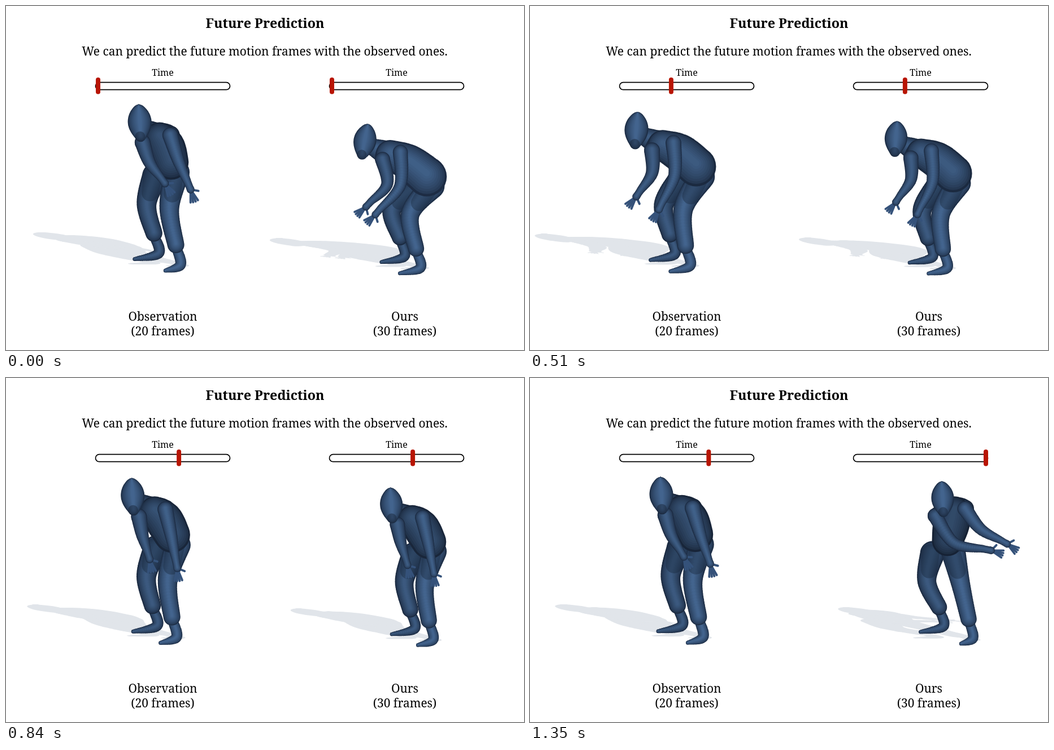
These frames come from a looping animation (917x611 px, 1.38 s). An HTML page with a canvas:

```html
<!DOCTYPE html>
<html lang="en">
<head>
<meta charset="utf-8">
<title>Future Prediction</title>
<style>
  html, body { margin: 0; width: 100%; height: 100%; overflow: hidden; background: #fff; }
  canvas, svg { position: absolute; left: 0; top: 0; width: 917px; height: 611px; }
  text { font: 20.9px "Noto Serif", serif; text-anchor: middle; }
  .title { font-size: 23.3px; font-weight: bold; }
  .small { font-size: 16px; }
  .track { fill: none; stroke: #000; stroke-width: 1.7px; }
  .thumb { fill: #b81503; }
</style>
</head>
<body>
<canvas width="917" height="611"></canvas>
<svg viewBox="0 0 917 611">
  <text class="title" x="458.5" y="39">Future Prediction</text>
  <text x="458" y="88">We can predict the future motion frames with the observed ones.</text>
  <text class="small" x="277.5" y="124">Time</text>
  <text class="small" x="691.5" y="124">Time</text>
  <rect class="track" x="158.5" y="135.7" width="238" height="13" rx="6.5"/>
  <rect class="track" x="572.5" y="135.7" width="238" height="13" rx="6.5"/>
  <rect class="thumb" y="127" width="8" height="29.5" rx="4"/>
  <rect class="thumb" y="127" width="8" height="29.5" rx="4"/>
  <text x="277.5" y="559">Observation</text>
  <text x="277.5" y="585">(20 frames)</text>
  <text x="706" y="559">Ours</text>
  <text x="706" y="585">(30 frames)</text>
</svg>
<script>
const LOOP = 1380, STEP = 30, OBSERVED_END = 900;
const ctx = document.querySelector('canvas').getContext('2d');
const [leftThumb, rightThumb] = document.querySelectorAll('.thumb');

const mix = (a, b, u) => a + (b - a) * u;
const add = (p, dx, dy) => [p[0] + dx, p[1] + dy];
const between = (p, q, u) => [mix(p[0], q[0], u), mix(p[1], q[1], u)];

// Turn of the body: 0 bent over, 1 half raised, 2 arms swung out.
function turnAt(t) {
  const u = Math.max(0, (t - 140) / (1350 - 140));
  return 2 * u * u * (3 - 2 * u);
}

// Parabolic path through three points, reached at turns 0, 1 and 2.
function along(turn, a, b, c) {
  const wa = (turn - 1) * (turn - 2) / 2, wb = turn * (2 - turn), wc = turn * (turn - 1) / 2;
  return [0, 1].map(k => a[k] * wa + b[k] * wb + c[k] * wc);
}

function spline(a, b, c, d, u) {
  return b + .5 * u * (c - a + u * (2 * a - 5 * b + 4 * c - d + u * (3 * (b - c) + d - a)));
}

// Discs along a smooth curve through joints [point, radius].
function sample(joints) {
  const pts = joints.map(([p, r]) => [...p, r]);
  const at = i => pts[Math.max(0, Math.min(pts.length - 1, i))];
  const discs = [];
  for (let i = 0; i < pts.length - 1; i++)
    for (let s = 0; s <= 14; s++)
      discs.push([0, 1, 2].map(k => spline(at(i - 1)[k], at(i)[k], at(i + 1)[k], at(i + 2)[k], s / 14)));
  return discs;
}

function fillDiscs(discs, scale, color) {
  ctx.fillStyle = color;
  ctx.beginPath();
  for (const [x, y, r] of discs) {
    const R = Math.max(.5, r * scale), shift = Math.max(0, r * (1 - scale) * .2);
    ctx.moveTo(x + R, y - shift);
    ctx.arc(x, y - shift, R, 0, 7);
  }
  ctx.fill();
}

// A rounded limb, shaded from its dark rim to its lit middle.
function tube(joints, flat, light = 1) {
  const discs = sample(joints);
  if (flat) return fillDiscs(discs, 1.4, flat);
  for (let i = 0; i < 9; i++) {
    const u = (i / 8) ** .6;
    const rgb = [mix(32, 70, u), mix(49, 105, u), mix(75, 149, u)].map(v => v * light);
    fillDiscs(discs, 1 - i * .105, `rgb(${rgb})`);
  }
}

function arm(shoulder, wrist, bend, flat, light) {
  const elbow = add(between(shoulder, wrist, .52),
    (wrist[1] - shoulder[1]) * bend, (shoulder[0] - wrist[0]) * bend);
  const heading = Math.atan2(wrist[1] - elbow[1], wrist[0] - elbow[0]);
  const reach = (angle, length) => [Math.cos(angle) * length, Math.sin(angle) * length];
  const palm = add(wrist, ...reach(heading, 13));
  ctx.strokeStyle = flat || '#35527a';
  ctx.lineWidth = 4;
  ctx.lineCap = 'round';
  for (let finger = -2; finger <= 2; finger++) {
    const thumb = finger == -2;
    ctx.beginPath();
    ctx.moveTo(...palm);
    ctx.lineTo(...add(palm, ...reach(heading + finger * (thumb ? .5 : .2), thumb ? 14 : 23)));
    ctx.stroke();
  }
  tube([[shoulder, 14], [elbow, 11], [wrist, 7], [palm, 7]], flat, light);
}

function leg(hip, cuff, bone, footLength, flat, light) {
  const dx = cuff[0] - hip[0], dy = cuff[1] - hip[1], d = Math.hypot(dx, dy);
  const bend = Math.sqrt(Math.max(0, bone * bone - d * d / 4)) / d;
  const knee = add(between(hip, cuff, .5), -dy * bend, dx * bend);
  const heel = add(cuff, 8, 36);
  tube([[add(cuff, 2, 8), 9], [heel, 9.5], [add(heel, -footLength, 10), 3.5]], flat, light);
  tube([[hip, 23], [knee, 17.5], [cuff, 15]], flat, light);
  if (!flat) fillDiscs(sample([[add(hip, -4, 0), 17], [between(hip, knee, .6), 15]]), 1, 'rgba(24,38,58,.4)');
}

function body(turn, flat) {
  const path = (...points) => along(turn, ...points);
  const skull = path([175, 226], [212, 214], [275, 199]);
  const chest = path([222, 250], [254, 241], [297, 221]);
  const pelvis = path([290, 291], [295, 280], [284, 276]);
  const rightWrist = path([186, 338], [229, 315], [352, 292]);
  const leftWrist = path([203, 352], [279, 335], [383, 276]);
  const rightCuff = path([240, 404], [256, 405], [268, 400]);
  const leftCuff = path([270, 425], [287, 425], [323, 422]);

  const rightShoulder = add(chest, -14 - 11 * turn, 9);
  const leftShoulder = add(chest, 19, -4);
  const waist = add(between(chest, pelvis, .5), 1, -5);
  const shade = mix(.9, .7, turn / 2);
  const nod = mix(-6, 2, Math.min(1, turn));
  const tip = add(skull, -nod, -31), chin = add(skull, nod * .8, 24);

  leg(add(pelvis, -28, 24), rightCuff, 53, 42, flat, .85);
  leg(add(pelvis, 10, 18), leftCuff, 65.5, 38 - 8 * turn, flat, .95);
  tube([[add(skull, 5, 6), 13], [chest, 25]], flat, shade);
  tube([[rightShoulder, 14], [chest, 25], [leftShoulder, 17]], flat, shade);
  tube([[chest, 27], [waist, 34], [pelvis, 37 - 4 * turn]], flat, shade);
  arm(rightShoulder, rightWrist, mix(.25, -.2, turn / 2), flat, .88);
  arm(leftShoulder, leftWrist, mix(.18, -.1, turn / 2), flat, .92);
  tube([[tip, 1.5], [between(tip, skull, .42), 14], [skull, 21], [chin, 9.5]], flat, .95);
  if (!flat) fillDiscs([[...add(chin, -1, 0), 9]], 1, 'rgba(22,34,52,.45)');
}

function figure(turn, x, y, scale) {
  const ground = 460, lean = .6, squash = .2;
  ctx.save();
  ctx.translate(x, y);
  ctx.scale(scale, scale);
  ctx.save();
  ctx.transform(1, 0, lean, squash, -lean * ground, ground * (1 - squash));
  body(turn, '#e1e5ea');
  ctx.restore();
  body(turn);
  ctx.restore();
}

function draw() {
  const t = Math.floor(performance.now() % LOOP / STEP) * STEP;
  const observedTime = Math.min(t, OBSERVED_END);
  const thumbX = time => 159 + 230 * time / 1350;
  leftThumb.setAttribute('x', thumbX(observedTime));
  rightThumb.setAttribute('x', thumbX(t) + 414);
  ctx.clearRect(0, 0, 917, 611);
  // The observation opens just past its closing pose, then jumps back.
  figure(turnAt(t ? observedTime : OBSERVED_END + STEP), 0, 0, 1);
  figure(turnAt(t), 468, 25, .955);
  requestAnimationFrame(draw);
}
draw();
</script>
</body>
</html>
```
